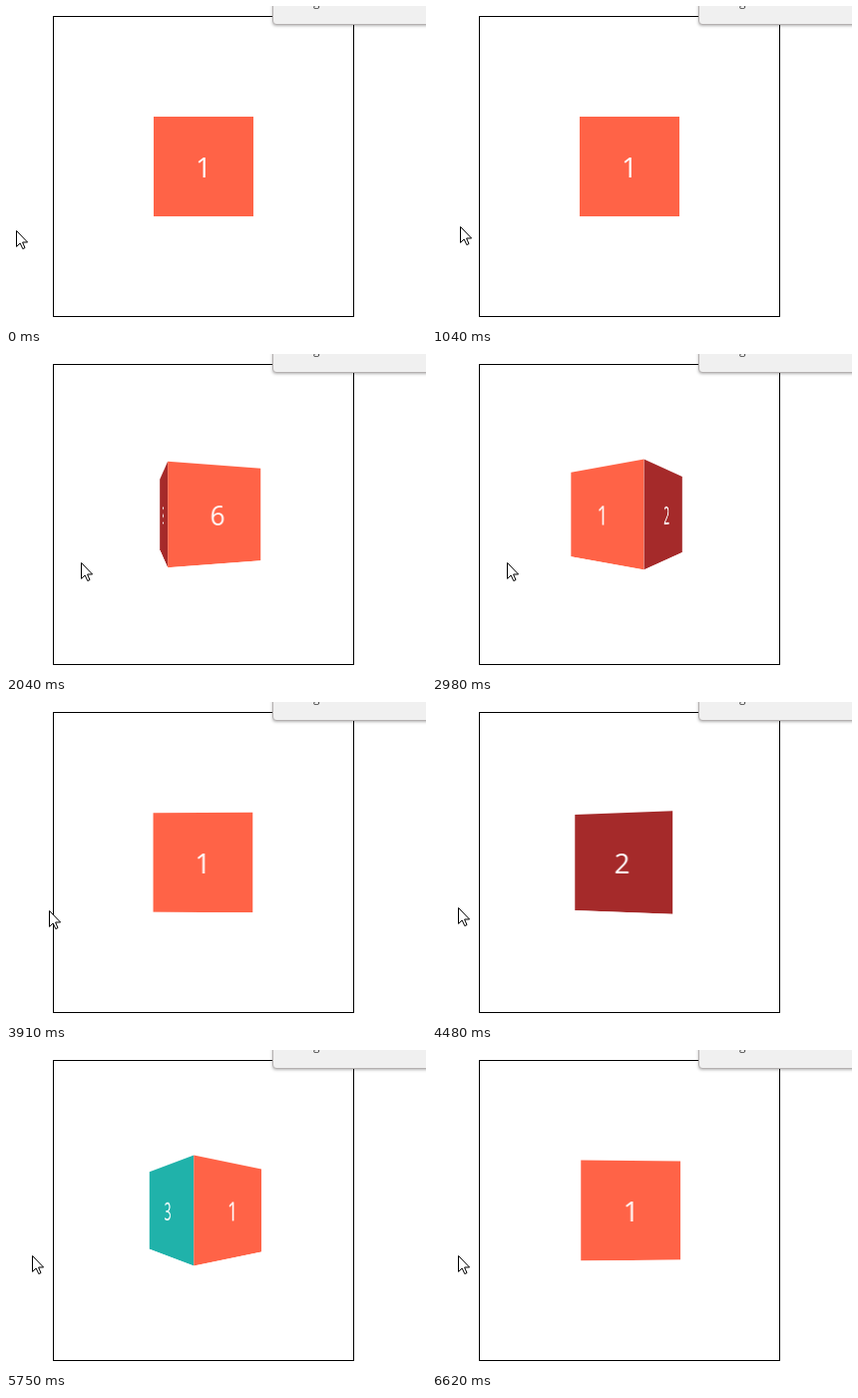
Recreate the animation shown at these times as an HTML page. Size 421 by 321 pixels, loop 6.65 s.

```html
<!DOCTYPE html>
<html lang="en">
<head>
<meta charset="utf-8">
<title>Rotating cube</title>
<style>
  html, body { margin: 0; width: 100%; height: 100%; overflow: hidden; background: #fff; }
  body { position: relative; }
  .box {
    position: absolute; left: 47px; top: 10px; width: 300px; height: 300px;
    border: 1px solid #000; perspective: 200px;
  }
  .cube, .face {
    position: absolute; width: 100px; height: 100px;
    transform-origin: 50% 50% -50px;
  }
  .cube { left: 100px; top: 100px; transform-style: preserve-3d; }
  .face {
    left: 0; top: 0; backface-visibility: hidden;
    color: #fff; font: 28px/100px "Open Sans", "Noto Sans", sans-serif; text-align: center;
  }
  .front { background: tomato; }
  .right { background: brown; transform: rotateY(90deg); }
  .back { background: tomato; transform: rotateY(180deg); }
  .left { background: lightseagreen; transform: rotateY(-90deg); }
  .panel {
    position: absolute; left: 267px; top: -20px; width: 180px; height: 37px;
    border: 1px solid #b4b0b0; border-radius: 4px; background: #f0f0f0;
    box-shadow: 0 1px 3px rgba(0, 0, 0, .3);
  }
  .panel span {
    position: absolute; left: 40px; top: 7px;
    color: #444; font: 12px/16px "Open Sans", sans-serif;
  }
  .cursor { position: absolute; left: 0; top: 0; }
</style>
</head>
<body>
<div class="box">
  <div class="cube">
    <div class="face front">1</div>
    <div class="face right">2</div>
    <div class="face back">6</div>
    <div class="face left">3</div>
  </div>
</div>
<div class="panel"><span>g</span></div>
<svg class="cursor" width="14" height="21">
  <path d="M.5 .5V16.4L4.2 13L6.8 18.6L9 17.6L6.6 12H11.6Z" fill="#fff" stroke="#000"/>
</svg>
<script>
  const LOOP = 6650, ENTER = 1090, LEAVE = 3912, SPIN = 3000;
  const cube = document.querySelector('.cube');
  const cursor = document.querySelector('.cursor');

  // Pointer path: time, x, y
  const path = [
    [0, 10, 225], [1000, 10, 225], [1080, 46, 217], [1180, 70, 211], [1300, 76, 210],
    [1640, 76, 210], [1720, 75, 209], [3600, 75, 209], [3800, 73, 209],
    [3910, 43, 209], [4060, 26, 206], [LOOP, 26, 206]
  ];

  // The CSS "ease" curve, cubic-bezier(.25, .1, .25, 1)
  function ease(x) {
    if (x <= 0) return 0;
    if (x >= 1) return 1;
    let lo = 0, hi = 1, u;
    for (let i = 0; i < 24; i++) {
      u = (lo + hi) / 2;
      if (.75 * u * (1 - u) + u ** 3 < x) lo = u; else hi = u;
    }
    return .3 * u * (1 - u) ** 2 + 3 * u * u * (1 - u) + u ** 3;
  }

  const spun = t => ease((t - ENTER) / SPIN);
  const reached = spun(LEAVE);

  function turn(t) {
    return t < LEAVE ? spun(t) : reached * (1 - ease((t - LEAVE) / (SPIN * reached)));
  }

  function pointer(t) {
    const i = path.findIndex(p => p[0] > t);
    const [t0, x0, y0] = path[i - 1], [t1, x1, y1] = path[i];
    const k = (t - t0) / (t1 - t0);
    return [x0 + (x1 - x0) * k, y0 + (y1 - y0) * k].map(Math.round);
  }

  function draw() {
    const t = performance.now() % LOOP;
    const [x, y] = pointer(t);
    cube.style.transform = `rotateY(${360 * turn(t)}deg)`;
    cursor.style.transform = `translate(${x}px, ${y}px)`;
    requestAnimationFrame(draw);
  }
  draw();
</script>
</body>
</html>
```
